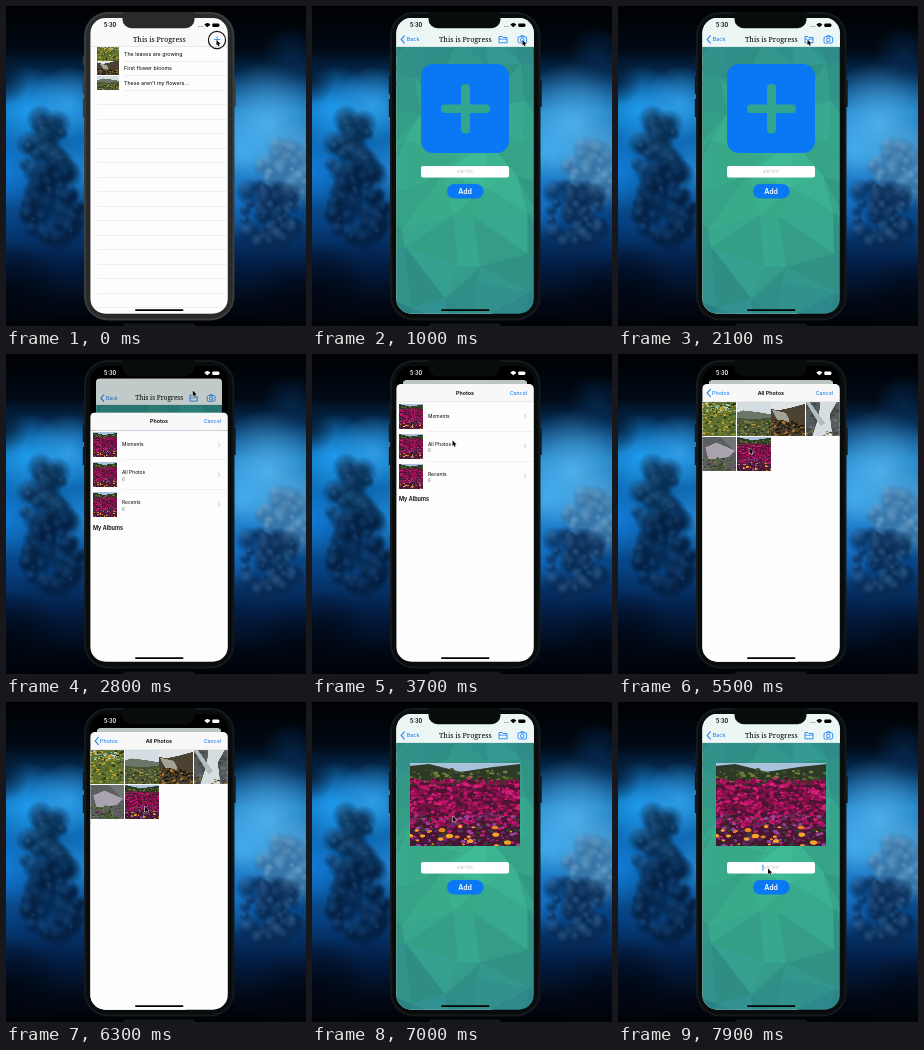
An HTML page with a canvas for the animation above (8000 ms loop, 300 by 320 pixels).

```html
<!DOCTYPE html>
<html lang="en">
<head>
<meta charset="utf-8">
<title>Progress app</title>
<style>
html, body { margin: 0; width: 100%; height: 100%; overflow: hidden; background: #000; }
canvas { display: block; width: 300px; height: 320px; }
</style>
</head>
<body>
<canvas id="stage"></canvas>
<script>
const LOOP = 8000, BLUE = '#0a78f5', PAPER = '#fdfdfd', TAU = Math.PI * 2;
const stage = document.getElementById('stage');
const dpr = window.devicePixelRatio || 1;
stage.width = 300 * dpr;
stage.height = 320 * dpr;
let g = stage.getContext('2d');

function seeded(seed) {
  return () => {
    seed = (seed * 1664525 + 1013904223) >>> 0;
    return seed / 4294967296;
  };
}

// Render once into an offscreen picture at double size.
function picture(w, h, paint) {
  const c = document.createElement('canvas'), main = g;
  c.width = w * 2;
  c.height = h * 2;
  g = c.getContext('2d');
  g.scale(2, 2);
  paint();
  g = main;
  return c;
}

function rect(x, y, w, h, color) {
  g.fillStyle = color;
  g.fillRect(x, y, w, h);
}

function round(x, y, w, h, r, color) {
  g.beginPath();
  g.roundRect(x, y, w, h, r);
  if (color) { g.fillStyle = color; g.fill(); }
}

function poly(points, color) {
  g.beginPath();
  points.forEach(([x, y]) => g.lineTo(x, y));
  g.closePath();
  g.fillStyle = color;
  g.fill();
}

function line(points, color, width) {
  g.beginPath();
  points.forEach(([x, y]) => g.lineTo(x, y));
  g.strokeStyle = color;
  g.lineWidth = width;
  g.stroke();
}

function dot(x, y, r, color, flat = 1) {
  g.beginPath();
  g.ellipse(x, y, r, r * flat, 0, 0, TAU);
  g.fillStyle = color;
  g.fill();
}

function text(s, x, y, size, color = '#000', weight = 400, align = 'left', family = 'Inter, sans-serif') {
  g.font = `${weight} ${size}px ${family}`;
  g.textAlign = align;
  g.textBaseline = 'middle';
  g.fillStyle = color;
  g.fillText(s, x, y);
}

// Soft disc; core is the share of the radius that stays solid.
function glow(x, y, r, rgb, alpha, core = 0) {
  const grad = g.createRadialGradient(x, y, r * core, x, y, r);
  grad.addColorStop(0, `rgba(${rgb},${alpha})`);
  grad.addColorStop(.5, `rgba(${rgb},${alpha * .55})`);
  grad.addColorStop(1, `rgba(${rgb},0)`);
  rect(x - r, y - r, r * 2, r * 2, grad);
}

// Blue storm clouds behind the phone
const sky = picture(300, 320, () => {
  const rnd = seeded(7);
  const grad = g.createLinearGradient(0, 0, 0, 320);
  [[0, '#000102'], [.14, '#010a16'], [.24, '#06396b'], [.33, '#0f70b8'], [.5, '#0c60a8'],
   [.68, '#07407f'], [.8, '#031f48'], [.92, '#020a18'], [1, '#000205']]
    .forEach(([at, color]) => grad.addColorStop(at, color));
  rect(0, 0, 300, 320, grad);
  [[22, 102, 42, '35,165,250', .8], [62, 98, 38, '55,170,245', .8], [0, 165, 40, '20,130,225', .8],
   [76, 165, 34, '40,150,230', .7], [262, 118, 62, '90,185,240', .85], [236, 145, 48, '75,180,245', .8],
   [295, 160, 45, '110,185,230', .7], [285, 50, 30, '8,50,95', .6], [232, 195, 40, '25,130,225', .7],
   [0, 75, 24, '2,15,30', .6], [8, 285, 50, '0,5,14', .7], [290, 295, 45, '0,5,14', .6]]
    .forEach(b => glow(...b));
  // Billows stack from top to bottom, each lit from the upper left
  const billows = (cx, cy, sx, sy, count, dark, light) => {
    for (let i = 0; i < count; i++) {
      const v = i / count * 2 - 1, w = sx * Math.sqrt(1 - v * v * .9);
      const x = cx + (rnd() * 2 - 1) * w, y = cy + v * sy, r = 5 + rnd() * 9;
      glow(x, y, r * 1.1, dark, .7, .3);
      glow(x - r * .3, y - r * .45, r * .6, light, .2 + rnd() * .22);
    }
  };
  billows(38, 145, 22, 32, 38, '8,45,82', '60,130,190');
  billows(48, 200, 27, 36, 48, '4,32,66', '35,100,165');
  billows(278, 172, 24, 30, 30, '55,115,165', '165,205,230');
  billows(262, 210, 30, 30, 46, '8,42,84', '75,130,185');
});

// Low-poly teal wallpaper, brightest in the middle
const wallpaper = picture(138, 296, () => {
  const rnd = seeded(21), cols = 5, rows = 9, pts = [];
  for (let j = 0; j <= rows; j++) {
    pts.push([]);
    for (let i = 0; i <= cols; i++)
      pts[j].push([(i - .5) * 35 + (rnd() - .5) * 24, (j - .5) * 37 + (rnd() - .5) * 26]);
  }
  const facet = (a, b, c) => {
    const x = (a[0] + b[0] + c[0]) / 3, y = (a[1] + b[1] + c[1]) / 3;
    const d = Math.min(1, Math.hypot((x - 66) / 170, (y - 155) / 150));
    const color = `hsl(${162 + 20 * d * d},50%,${48 - 12 * d + (rnd() - .5) * 4}%)`;
    poly([a, b, c], color);
    line([a, b, c, a], color, .5);
  };
  for (let j = 0; j < rows; j++)
    for (let i = 0; i < cols; i++) {
      const [a, b, c, d] = [pts[j][i], pts[j][i + 1], pts[j + 1][i], pts[j + 1][i + 1]];
      if (rnd() < .5) { facet(a, b, c); facet(b, c, d); }
      else { facet(a, b, d); facet(a, c, d); }
    }
});

// Simple landscapes on a 112 x 84 field
function specks(rnd, count, y0, y1, colors, size) {
  for (let i = 0; i < count; i++) {
    const y = y0 + (y1 - y0) * i / count;
    dot(rnd() * 112, y + rnd() * 5, size * (.5 + rnd()), colors[Math.floor(rnd() * colors.length)], .6);
  }
}
const GREENS = ['#3c4f26', '#566f2f', '#2a3a1c', '#70803a'];
const photo = (seed, color, paint) => picture(112, 84, () => {
  rect(0, 0, 112, 84, color);
  paint(seeded(seed));
});
const leaves = photo(1, '#5f7030', r => {
  specks(r, 40, 0, 22, ['#b9d1d2', '#8cae8d'], 4);
  specks(r, 320, 0, 84, [...GREENS, '#c9a52a', '#8f9436'], 3);
});
const hills = photo(2, '#d3dde2', r => {
  poly([[0, 30], [30, 20], [65, 24], [112, 32], [112, 60], [0, 60]], '#6b7568');
  poly([[0, 38], [60, 42], [112, 36], [112, 84], [0, 84]], '#4a5535');
  specks(r, 220, 42, 84, [...GREENS, '#b5953a', '#7b6f45'], 2.6);
});
const cliff = photo(3, '#dfe5e6', r => {
  poly([[0, 12], [30, 20], [60, 14], [112, 0], [112, 84], [0, 84]], '#4b4234');
  poly([[15, 18], [50, 26], [62, 50], [30, 45]], '#a3a298');
  specks(r, 180, 42, 84, ['#2b2515', '#54421c', '#a8752a', '#1d1a10'], 3);
});
const falls = photo(4, '#555b5d', r => {
  specks(r, 90, 0, 84, ['#424748', '#686e70', '#4d5148'], 5);
  poly([[50, 0], [90, 0], [73, 30], [80, 84], [30, 84], [46, 35]], '#d6dde0');
  poly([[14, 0], [24, 0], [62, 52], [50, 58]], '#b2bcc0');
  specks(r, 25, 66, 84, ['#93773a', '#374329'], 3);
});
const rocks = photo(5, '#6f7476', r => {
  poly([[0, 0], [60, 0], [95, 35], [112, 84], [0, 84]], '#5b5f60');
  poly([[22, 26], [50, 14], [96, 34], [80, 50], [30, 56]], '#a8a3ac');
  specks(r, 160, 50, 84, [...GREENS, '#6f4565'], 2.6);
});
const pinks = photo(6, '#4a1535', r => {
  rect(0, 0, 112, 14, '#a9c2db');
  poly([[0, 3], [20, 1], [52, 9], [85, 4], [112, 1], [112, 22], [0, 22]], '#2d3a28');
  specks(r, 90, 6, 18, GREENS, 1.8);
  specks(r, 850, 15, 62, ['#c01468', '#a60f5c', '#d42079', '#7a123f', '#4a1530', '#8f1050'], 2.1);
  specks(r, 330, 50, 84, ['#96449a', '#5a2f62', '#b0246f', '#33412a', '#2a2426', '#4f1a3a'], 1.8);
  specks(r, 22, 62, 82, ['#e8861c', '#f5a528'], 2.6);
});

// Centre-cropped picture
function image(pic, x, y, w, h) {
  const k = Math.min(pic.width / w, pic.height / h);
  g.drawImage(pic, (pic.width - w * k) / 2, (pic.height - h * k) / 2, w * k, h * k, x, y, w, h);
}

const lerp = (a, b, p) => a + (b - a) * p;
function ease(t, from, to) {
  const p = Math.min(1, Math.max(0, (t - from) / (to - from)));
  return p * p * (3 - 2 * p);
}

function shifted(dx, dy, paint, alpha = 1) {
  g.save();
  g.translate(dx, dy);
  g.globalAlpha *= alpha;
  paint();
  g.restore();
}

function list() {
  rect(84, 41, 138, 267, PAPER);
  [[leaves, 'The leaves are growing'], [cliff, 'First flower blooms'], [hills, "These aren't my flowers..."]]
    .forEach(([pic, label], i) => {
      image(pic, 91, 40.6 + i * 14.5, 22, 14.3);
      text(label, 118, 48 + i * 14.5, 5.3);
    });
  for (let i = 0; i < 18; i++) rect(i < 3 ? 118 : 91, 55 + i * 14.5, 131, .5, '#dedede');
}

function addForm(t) {
  g.drawImage(wallpaper, 84, 12, 138, 296);
  if (t < 6400) {
    round(109, 58, 88, 89, 12, BLUE);
    round(129, 98.5, 49, 8.5, 4, '#31a58d');
    round(149, 78, 9, 49.5, 4, '#31a58d');
  } else {
    image(pinks, 97.5, 61, 110.5, 83);
  }
  round(109, 160, 88, 11.5, 2, '#fff');
  text('add title', 153, 166, 4.2, '#c4c4c8', 400, 'center');
  if (t > 7500) rect(144.5, 162.5, .8, 6.5, BLUE);
  round(135, 178, 36.5, 14.5, 7.2, BLUE);
  text('Add', 153, 185.6, 7, '#fff', 600, 'center');
}

function back(label, x, y) {
  line([[92.7, y - 4], [89.2, y], [92.7, y + 4]], BLUE, 1.1);
  text(label, x, y + .2, 5.4, BLUE);
}

function folderAndCamera() {
  line([[187, 36.8], [187, 30.5], [190, 30.5], [191, 31.5], [195, 31.5], [195, 36.8], [187, 36.8]], BLUE, .8);
  line([[187, 33.2], [195, 33.2]], BLUE, .7);
  g.strokeStyle = BLUE;
  g.lineWidth = .8;
  round(206, 30.8, 8.6, 6.2, 1.2);
  g.stroke();
  line([[208.3, 30.8], [209, 29.7], [211.6, 29.7], [212.3, 30.8]], BLUE, .8);
  g.beginPath();
  g.arc(210.3, 33.9, 1.8, 0, TAU);
  g.stroke();
}

function app(t) {
  const p = ease(t, 250, 700);
  shifted(-42 * p, 0, list);
  if (p > 0) shifted(138 * (1 - p), 0, () => addForm(t));
  rect(84, 12, 138, 29, '#f9f9f9');
  shifted(0, 0, () => rect(84, 12, 138, 29, '#ebf6f5'), p);
  rect(84, 40.6, 138, .4, '#c6cccb');
  text('This is Progress', 153.3, 33.8, 7.1, '#000', 500, 'center', '"Noto Serif", serif');
  shifted(0, 0, () => {
    line([[208, 33.5], [214.5, 33.5]], BLUE, .7);
    line([[211.2, 30.2], [211.2, 36.8]], BLUE, .7);
  }, 1 - p);
  shifted(0, 0, () => { back('Back', 94.8, 33.5); folderAndCamera(); }, p);
}

function albums() {
  rect(84, 48, 138, 260, PAPER);
  [['Moments', 50], ['All Photos', 80], ['Recents', 110]].forEach(([label, y], i) => {
    image(pinks, 87, y, 24, 24.5);
    text(label, 116, y + (i ? 10.2 : 12.2), 4.9);
    if (i) text('6', 116, y + 17, 4.6, '#777');
    line([[212, y + 10], [214, y + 12.3], [212, y + 14.6]], '#bcbcc0', .8);
    if (i < 2) rect(116, y + 27.2, 106, .4, '#ddd');
  });
  text('My Albums', 87, 145.6, 5.5, '#000', 600);
}

function grid() {
  rect(84, 48, 138, 260, PAPER);
  [leaves, hills, cliff, falls, rocks, pinks].forEach((pic, i) =>
    image(pic, 84 + i % 4 * 34.6, 48.3 + Math.floor(i / 4) * 34.6, 34, 34));
}

function picker(t) {
  const p = ease(t, 3950, 4400);
  round(84, 30, 138, 300, 5);
  g.clip();
  shifted(-42 * p, 0, albums);
  if (p > 0) shifted(138 * (1 - p), 0, grid);
  rect(84, 30, 138, 18, '#f8f8f8');
  rect(84, 47.7, 138, .4, '#ccc');
  shifted(-25 * p, 0, () => text('Photos', 153, 39.2, 5.3, '#000', 600, 'center'), 1 - p);
  shifted(40 * (1 - p), 0, () => {
    text('All Photos', 152.8, 39.2, 5.4, '#000', 600, 'center');
    back('Photos', 94, 39);
  }, p);
  text('Cancel', 215, 39.2, 5.3, BLUE, 400, 'right');
}

function statusBar(color, showDots) {
  text('5:30', 98, 19.3, 5.5, color, 600);
  if (showDots) for (let i = 0; i < 4; i++) dot(192.5 + i * 1.5, 20.3, .4, color);
  g.beginPath();
  g.moveTo(201.3, 21.3);
  g.arc(201.3, 21.3, 4, -Math.PI * .77, -Math.PI * .23);
  g.fillStyle = color;
  g.fill();
  round(206.3, 17.5, 6.8, 3.6, 1, color);
  rect(213.4, 18.6, .5, 1.4, color);
}

const PATH = [[0, 210.5, 34], [1300, 210.5, 34], [2000, 189.5, 33.5], [2700, 189.5, 33.5], [3400, 140.5, 86.5],
  [4150, 140.5, 86.5], [4600, 130, 92], [5300, 130, 92], [6100, 139, 104.5], [6850, 139, 104.5],
  [7450, 150, 166.5], [8000, 150, 166.5]];
const CLICKS = [-50, 2250, 3800, 6320, 7480];

function cursor(t) {
  const i = PATH.findIndex(k => k[0] > t), a = PATH[i - 1], b = PATH[i];
  const p = ease(t, a[0], b[0]), x = lerp(a[1], b[1], p), y = lerp(a[2], b[2], p);
  if (CLICKS.some(c => t >= c && t < c + 250)) {
    g.beginPath();
    g.arc(x + .5, y, 8.6, 0, TAU);
    g.strokeStyle = '#111';
    g.lineWidth = 1.2;
    g.stroke();
  }
  shifted(x, y, () => {
    const arrow = [[0, 0], [0, 5.6], [1.3, 4.5], [2.2, 6.5], [3.1, 6.1], [2.3, 4.2], [4, 4.1]];
    line([...arrow, arrow[0]], '#fff', .9);
    poly(arrow, '#000');
  });
}

function phoneBody(edge, bezel) {
  [[76.8, 50, 9], [76.8, 70, 18], [76.8, 93, 18], [228, 74, 27]].forEach(([x, y, h]) => rect(x, y, 1.7, h, edge));
  round(78, 6, 150.5, 308.5, 24, edge);
  round(80, 8, 146.5, 304.5, 22, bezel);
}

function draw(t) {
  const edge = t < 250 ? '#3b3d3b' : '#15191b', bezel = t < 250 ? '#292b2a' : '#090c0d';
  g.setTransform(dpr, 0, 0, dpr, 0, 0);
  g.drawImage(sky, 0, 0, 300, 320);
  round(117, 317.5, 72, 5, 2, '#14171a');
  phoneBody(edge, bezel);

  const m = ease(t, 2400, 2900) - ease(t, 6450, 6950);
  g.save();
  round(84.4, 12, 137.4, 295.7, 15, '#000');
  g.clip();
  g.save();
  g.translate(153, 12 + 14 * m);
  g.scale(1 - .1 * m, 1 - .1 * m);
  g.translate(-153, -12);
  round(84, 12, 138, 296, 5 * m);
  g.clip();
  app(t);
  rect(84, 12, 138, 296, `rgba(0,0,0,${.2 * m})`);
  g.restore();
  if (m > 0) shifted(0, 278 * (1 - m), () => picker(t));
  statusBar(m > .5 ? '#fff' : '#000', m < .5);
  round(129, 303.2, 48.5, 1.7, .8, '#000');
  g.restore();

  round(116.5, 6, 72, 16.2, [0, 0, 9, 9], bezel);
  cursor(t);
}

const start = performance.now();
function tick() {
  draw((performance.now() - start) % LOOP);
  requestAnimationFrame(tick);
}
tick();
</script>
</body>
</html>
```
